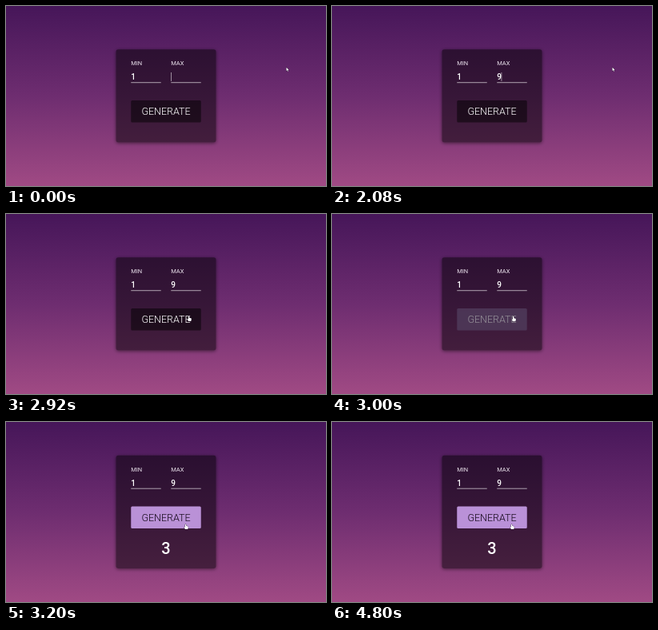
An HTML page with a canvas for the animation above (4.84 s loop, 400 by 225 pixels).

```html
<!DOCTYPE html>
<html lang="en">
<head>
<meta charset="utf-8">
<title>Random number generator</title>
<style>
html, body { margin: 0; width: 100%; height: 100%; overflow: hidden; background: #6e2d70; }
canvas { display: block; width: 400px; height: 225px; }
</style>
</head>
<body>
<canvas id="stage"></canvas>
<script>
const W = 400, H = 225, LOOP = 4840, STEP = 40;
const CLICK = 3160, HOVER = 2920, FADE = 300;
const canvas = document.getElementById('stage');
const ctx = canvas.getContext('2d');
const dpr = window.devicePixelRatio || 1;
canvas.width = W * dpr;
canvas.height = H * dpr;
ctx.scale(dpr, dpr);

const sky = ctx.createLinearGradient(0, 0, 0, H);
sky.addColorStop(0, '#461659');
sky.addColorStop(0.5, '#6e2d70');
sky.addColorStop(1, '#a04a84');

// Pointer tip: time, x, y
const path = [
  [0, 350.5, 76.7], [2160, 350.5, 76.7], [2320, 350.8, 76.5], [2600, 350.8, 76.5],
  [2920, 228.6, 127.4], [3080, 224.8, 128.2], [3160, 224.6, 127.6], [LOOP, 224.6, 127.6]
];

const clamp = v => Math.max(0, Math.min(1, v));
const smooth = p => p * p * (3 - 2 * p);
const mix = (a, b, p) => a + (b - a) * p;
const mixRgba = (a, b, p) => `rgba(${a.map((v, i) =>
  i < 3 ? Math.round(mix(v, b[i], p)) : mix(v, b[i], p).toFixed(3)).join(',')})`;

// Solves the CSS "ease" curve by bisection
function ease(x) {
  const bez = (a, b, s) => 3 * a * s * (1 - s) ** 2 + 3 * b * s * s * (1 - s) + s ** 3;
  let lo = 0, hi = 1;
  for (let i = 0; i < 20; i++) {
    const s = (lo + hi) / 2;
    if (bez(0.25, 0.25, s) < x) lo = s; else hi = s;
  }
  return bez(0.1, 1, lo);
}

function box(x, y, w, h, r) {
  ctx.beginPath();
  ctx.roundRect(x, y, w, h, r);
}

function text(str, x, y, size, weight, color, align = 'left') {
  ctx.font = `${weight} ${size}px Roboto, sans-serif`;
  ctx.textAlign = align;
  ctx.fillStyle = color;
  ctx.fillText(str, x, y);
}

function card(y, h) {
  ctx.save();
  ctx.shadowColor = 'rgba(0,0,0,0.5)';
  ctx.shadowBlur = 4 * dpr;
  ctx.shadowOffsetY = dpr;
  box(137.5, y, 125, h, 3);
  ctx.fillStyle = sky;
  ctx.fill();
  ctx.restore();
  ctx.fillStyle = 'rgba(0,0,0,0.5)';
  ctx.fill();
}

function field(label, value, x, dy) {
  text(label, x, 74.2 + dy, 7.5, 400, '#eee6f0');
  text(value, x, 92 + dy, 10, 500, '#fff');
  ctx.fillStyle = 'rgba(255,255,255,0.6)';
  ctx.fillRect(x, 95.2 + dy, 37.5, 1);
}

function caret(t) {
  const on = t < 240 || (t >= 760 && t < 1560) || (t >= 2080 && t < 2600);
  if (!on) return;
  ctx.fillStyle = 'rgba(255,255,255,0.65)';
  ctx.fillRect(t < 1000 ? 206.2 : 211.5, 83, 0.8, 11);
}

function button(t, dy) {
  const p = ease(clamp((t - HOVER) / FADE));
  box(156.25, 118 + dy, 87.5, 27.5, 1.5);
  ctx.fillStyle = mixRgba([0, 0, 0, 0.5], [186, 145, 216, 1], p);
  ctx.fill();
  text('GENERATE', 200, 136.2 + dy, 12.5, 300, mixRgba([255, 255, 255, 1], [20, 8, 25, 1], p), 'center');
}

function pointerAt(t) {
  const i = path.findIndex((k, n) => n && t < k[0]);
  const a = path[i - 1], b = path[i];
  const p = smooth((t - a[0]) / (b[0] - a[0]));
  return [mix(a[1], b[1], p), mix(a[2], b[2], p)];
}

function pointer(t) {
  const [x, y] = pointerAt(t);
  const hand = x < 243.75 && y > 118;
  ctx.save();
  ctx.translate(x, y);
  const shape = new Path2D(hand
    ? 'M-.7 .6Q0-.5 .7 .6V2.4L2.7 2.9Q3.3 3.1 3.2 4L2.7 6.5H-.6L-2 4.2Q-1.8 3.2-.7 4Z'
    : 'M0 0V4.4L1 3.6L1.7 5L2.4 4.7L1.8 3.3H3.1Z');
  ctx.lineJoin = 'round';
  ctx.lineWidth = 0.7;
  ctx.strokeStyle = 'rgba(25,10,30,0.8)';
  ctx.stroke(shape);
  ctx.fillStyle = '#fff';
  ctx.fill(shape);
  ctx.restore();
}

function draw(t) {
  const open = t >= CLICK;
  const dy = open ? -12.5 : 0;
  ctx.fillStyle = sky;
  ctx.fillRect(0, 0, W, H);
  card(54.3 + dy, open ? 141.2 : 116.2);
  field('MIN', '1', 156.25, dy);
  field('MAX', t < 1000 ? '' : '9', 206.25, dy);
  caret(t);
  button(t, dy);
  if (open) text('3', 200, 165.2, 20, 500, '#fff', 'center');
  pointer(t);
}

const start = performance.now();
function tick() {
  const t = (performance.now() - start) % LOOP;
  draw(Math.floor(t / STEP) * STEP);
  requestAnimationFrame(tick);
}
tick();
</script>
</body>
</html>
```
